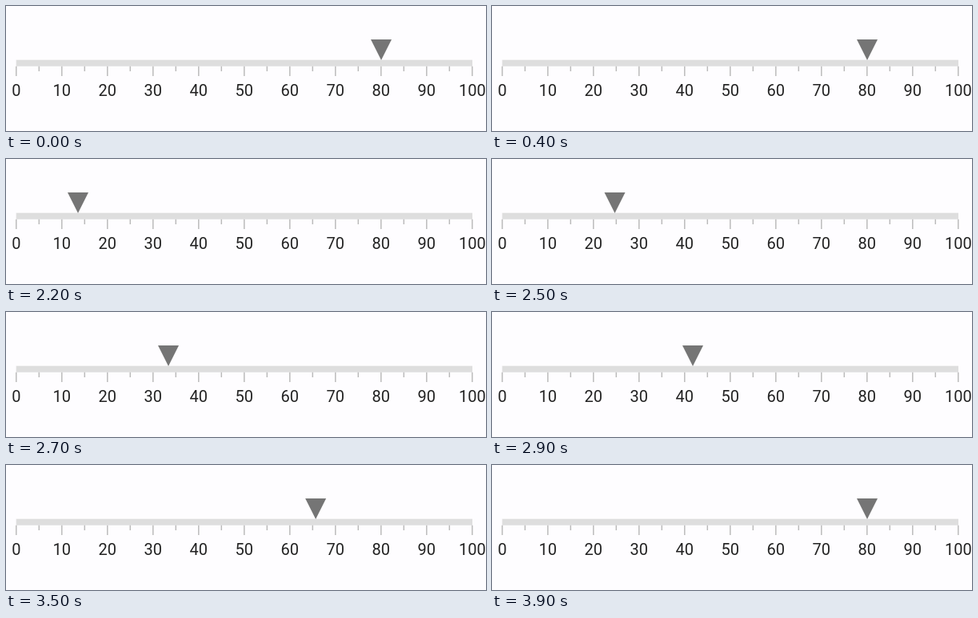
Write an HTML page that moves like this. It is 600 by 157 pixels and loops after 5700 ms.

```html
<!DOCTYPE html>
<html lang="en">
<head>
<meta charset="utf-8">
<title>Linear gauge</title>
<style>
html, body { margin: 0; height: 100%; overflow: hidden; background: #fefdff; }
svg { display: block; width: 600px; height: 157px; }
text { font: 20px Roboto, sans-serif; fill: #222; text-anchor: middle; }
</style>
</head>
<body>
<svg viewBox="0 0 600 157">
  <rect x="12.7" y="67.7" width="570.3" height="8" fill="#dedede"/>
  <g id="scale" stroke="#bbb" stroke-width="1.5"></g>
  <path id="pointer" d="M-13 42H13L0 68Z" fill="#757575"/>
</svg>
<script>
const LOOP = 5700, STEP = 100;
const scale = document.getElementById('scale');
const pointer = document.getElementById('pointer');

// [time in ms, pointer x]
const path = [[1900, 24], [2400, 134], [2500, 153.5], [2700, 203],
  [3000, 275], [3200, 324.5], [3600, 408], [3900, 469]];

function add(tag, attrs, text = '') {
  const el = document.createElementNS('http://www.w3.org/2000/svg', tag);
  for (const key in attrs) el.setAttribute(key, attrs[key]);
  el.textContent = text;
  scale.append(el);
}

for (let value = 0; value <= 100; value += 5) {
  const x = 12.8 + value * 5.7, major = value % 10 === 0;
  add('line', { x1: x, x2: x, y1: 75.7, y2: major ? 88 : 82 });
  if (major) add('text', { x, y: 112.5, stroke: 'none' }, value);
}

function pointerX(t) {
  if (t < path[0][0]) return 469;
  const next = path.findIndex(p => p[0] > t);
  if (next < 0) return 469;
  const [t0, x0] = path[next - 1], [t1, x1] = path[next];
  return x0 + (x1 - x0) * (t - t0) / (t1 - t0);
}

const start = performance.now();
function draw() {
  const t = (performance.now() - start) % LOOP;
  const x = pointerX(Math.floor(t / STEP) * STEP);
  pointer.setAttribute('transform', `translate(${x})`);
  requestAnimationFrame(draw);
}
draw();
</script>
</body>
</html>
```
